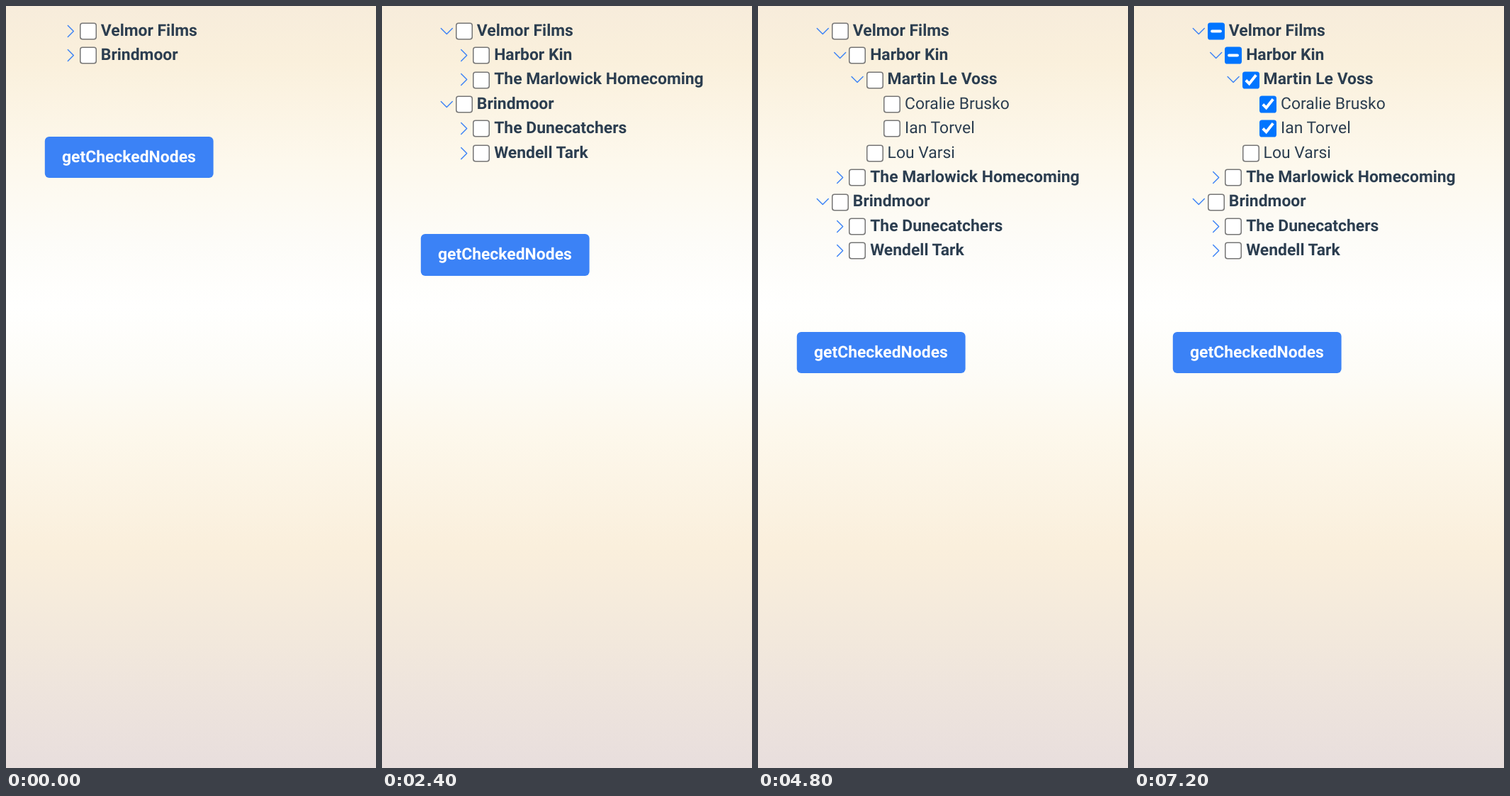
Write an HTML page that moves like this. It is 522 px wide and 1073 px high and loops after 8 s.

```html
<!DOCTYPE html>
<html lang="en">
<head>
<meta charset="utf-8">
<title>Checkbox tree</title>
<style>
  html, body { margin: 0; width: 100%; height: 100%; overflow: hidden; }
  body {
    background: linear-gradient(#f7ecdb 0, #faf0dc 7.3%, #fdf8ec 20%, #fdfcf8 31%, #fffffe 39.5%,
      #fdfcf7 48%, #fdf8ec 56%, #faefdc 71%, #f2e8dc 83.5%, #e8dedd 100%);
  }
  svg { display: block; width: 100%; height: 100%; }
  text { font: 22.9px Roboto, sans-serif; fill: #2c3e50; text-rendering: geometricPrecision; white-space: pre; }
  .bold { font-weight: 700; }
  .button { fill: #3b82f6; }
  .caption { font-weight: 700; fill: #fff; }
  .chevron { fill: none; stroke: #3b82f6; stroke-width: 1.4; stroke-linecap: round; stroke-linejoin: round; }
  .empty { fill: #fff; stroke: #767676; stroke-width: 1.5; }
  .filled { fill: #0075ff; }
  .tick { fill: none; stroke: #fff; stroke-width: 3.9; }
  .dash { fill: #fff; }
</style>
</head>
<body>
<svg id="stage" viewBox="0 0 522 1073" preserveAspectRatio="none"></svg>
<script>
const LOOP = 8000, STEP = 1200, STEPS = 7;
const ROW = 34.36, INDENT = 24.4, BOX = 24;

// opens / checks: the step at which a node expands or a leaf is ticked
const leaf = (label, checks = Infinity) => ({ label, checks, kids: [] });
const branch = (label, opens, ...kids) => ({ label, opens, kids });
const closed = label => branch(label, Infinity, leaf(''));

const tree = [
  branch('Velmor Films', 1,
    branch('Harbor Kin', 3,
      branch('Martin Le Voss', 4, leaf('Coralie Brusko', 5), leaf('Ian Torvel', 6)),
      leaf('Lou Varsi')),
    closed('The Marlowick Homecoming')),
  branch('Brindmoor', 2,
    closed('The Dunecatchers'),
    closed('Wendell Tark')),
];

// 0 = unchecked, 1 = checked, anything between = partly checked
function checkState(node, step) {
  if (!node.kids.length) return step >= node.checks ? 1 : 0;
  const states = node.kids.map(kid => checkState(kid, step));
  return states.every(s => s === states[0]) ? states[0] : 0.5;
}

function checkbox(state) {
  const h = BOX / 2;
  if (!state) {
    const side = BOX - 1.5;
    return `<rect class="empty" x="${-side / 2}" y="${-side / 2}" width="${side}" height="${side}" rx="3.2"/>`;
  }
  const mark = state === 1
    ? `<path class="tick" d="M${-0.3 * BOX} 0l${0.2 * BOX} ${0.2 * BOX}L${0.3 * BOX} ${-0.3 * BOX}"/>`
    : '<rect class="dash" x="-7.9" y="-1.9" width="15.8" height="3.8" rx="1.9"/>';
  return `<rect class="filled" x="${-h}" y="${-h}" width="${BOX}" height="${BOX}" rx="3.6"/>${mark}`;
}

// Boxes and baselines sit on whole pixels, as in page layout
function nodeRow(node, depth, index, step) {
  const isBranch = node.kids.length > 0;
  const turn = step >= node.opens ? 90 : 0;
  const indent = depth * INDENT;
  const baseline = Math.floor(42.24 + index * ROW);
  const boxX = Math.round(103.7 + indent) + BOX / 2;
  const boxY = Math.round(index * ROW) + 35.5;
  const chevron = isBranch
    ? `<path class="chevron" transform="translate(${91.3 + indent} ${baseline - 6.4}) rotate(${turn})" d="M-4 -8L4 0L-4 8"/>` : '';
  return chevron + `<g transform="translate(${boxX} ${boxY})">${checkbox(checkState(node, step))}</g>` +
    `<text x="${133.8 + indent}" y="${baseline}"${isBranch ? ' class="bold"' : ''}>${node.label}</text>`;
}

function button(shift) {
  const top = Math.round(183.75 + shift), bottom = Math.round(242.2 + shift);
  return `<rect class="button" x="54.8" y="${top}" width="237.8" height="${bottom - top}" rx="6.1"/>` +
    `<text class="caption" x="79" y="${Math.round(220 + shift)}">getCheckedNodes</text>`;
}

function scene(step) {
  const rows = [];
  const walk = (nodes, depth) => nodes.forEach(node => {
    rows.push(nodeRow(node, depth, rows.length, step));
    if (step >= node.opens) walk(node.kids, depth + 1);
  });
  walk(tree, 0);
  return rows.join('') + button((rows.length - tree.length) * ROW);
}

const stage = document.getElementById('stage');
const scenes = Array.from({ length: STEPS }, (_, step) => scene(step));
const start = performance.now();
let shown = -1;

function draw() {
  const step = Math.floor((performance.now() - start) % LOOP / STEP);
  if (step !== shown) stage.innerHTML = scenes[shown = step];
  requestAnimationFrame(draw);
}
draw();
</script>
</body>
</html>
```
